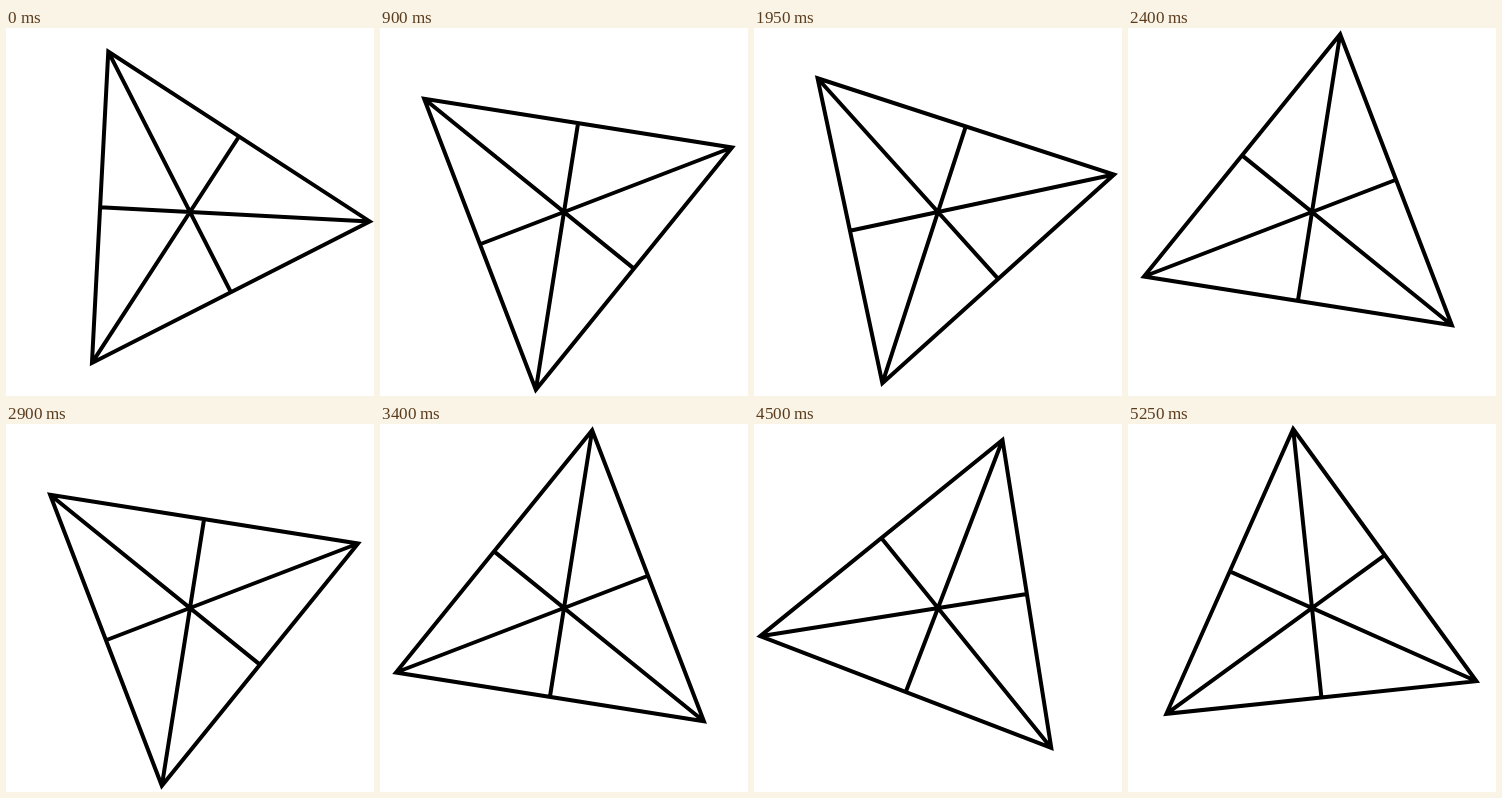
Animation of 368x368 px, one loop 5300 ms. Source, as an HTML page:

```html
<!DOCTYPE html>
<html lang="en">
<head>
<meta charset="utf-8">
<title>Rotating triangle</title>
<style>
  html, body { margin: 0; height: 100%; overflow: hidden; background: #fff; }
  svg { display: block; width: 100vw; height: 100vh; }
  path { fill: none; stroke: #000; stroke-width: 4; }
</style>
</head>
<body>
<svg viewBox="-184 -184 368 368"><path id="triangle"/></svg>
<script>
const RADIUS = 180, STEP_MS = 50, STEPS = 106;
const triangle = document.getElementById('triangle');

const polar = (r, deg) => {
  const a = deg * Math.PI / 180;
  return `${r * Math.cos(a)},${r * Math.sin(a)}`;
};

const corners = [0, 120, 240];
const outline = 'M' + corners.map(a => polar(RADIUS, a)).join('L') + 'Z';
const medians = corners.map(a => `M${polar(RADIUS, a)}L${polar(-RADIUS / 2, a)}`).join('');
triangle.setAttribute('d', outline + medians);

// Slow start, then alternating turns of 9 and 3 degrees.
const angle = n => 3 * Math.max(n + 1, 2 * n - 3 + n % 2);

function draw() {
  const step = Math.floor(performance.now() / STEP_MS) % STEPS;
  triangle.setAttribute('transform', `rotate(${angle(step)})`);
  requestAnimationFrame(draw);
}
draw();
</script>
</body>
</html>
```
